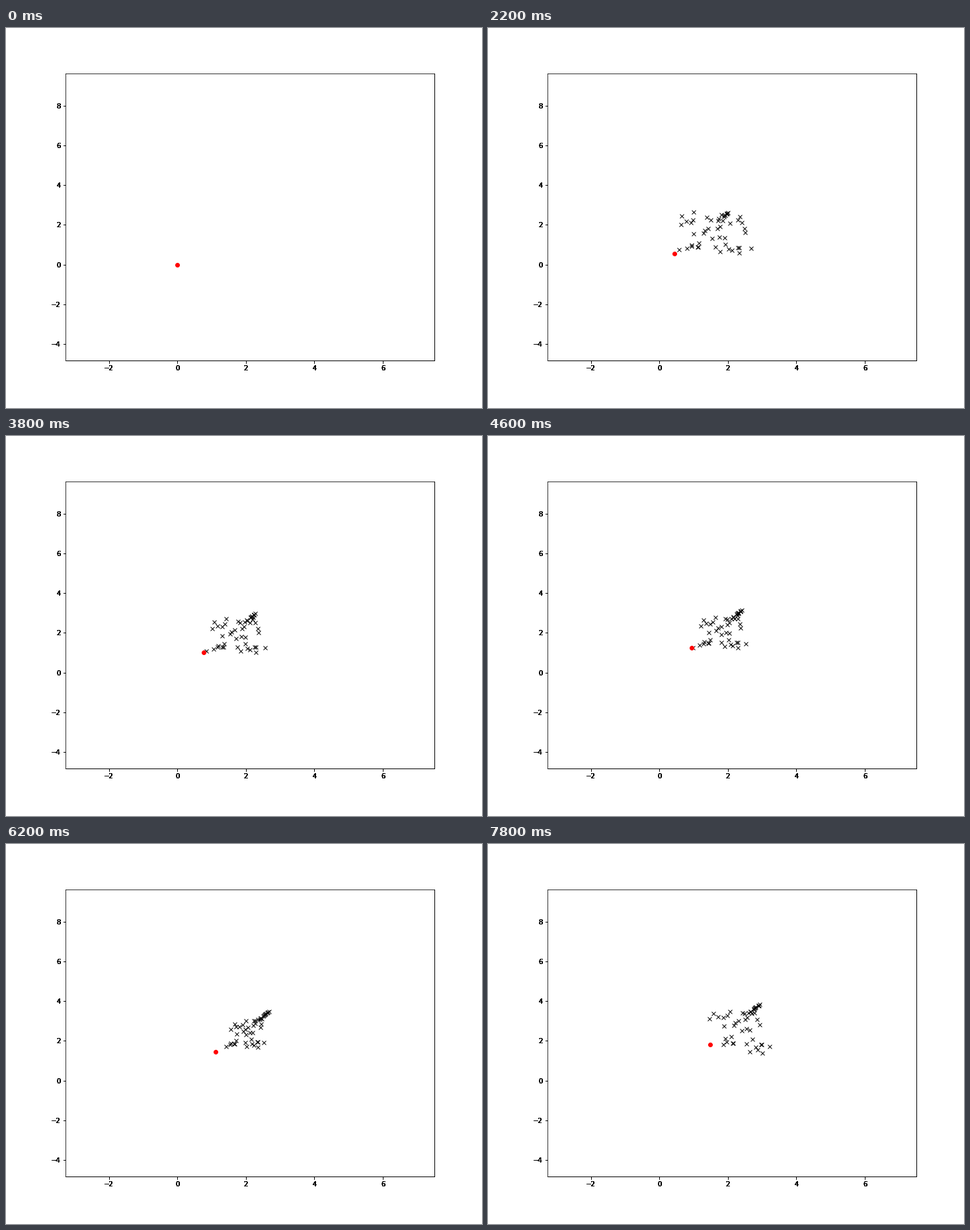
These frames come from a looping animation (720 px wide and 576 px high, 8 s). A matplotlib script:

```python
import numpy as np
import matplotlib.pyplot as plt
from matplotlib.animation import FuncAnimation

STEPS, INTERVAL = 40, 200
XLIM, YLIM = (-3.266, 7.504), (-4.834, 9.624)
SPEED = 0.0545                 # herd speed per step
FLEE, SCATTER = 0.087, 0.036   # push from the hunter, push from the leader
START, CAUGHT, PANIC, END = 1, 27, 31, STEPS - 1
PREY = 7                       # index of the animal that gets caught


def hunter(k):
    """Chase the prey, rest after the catch, then go on."""
    times = [START, CAUGHT, PANIC, END]
    return np.array([np.interp(k, times, [0, 1.12, 1.12, 1.485]),
                     np.interp(k, times, [0, 1.46, 1.46, 1.815])])


def unit(v):
    size = np.linalg.norm(v, axis=-1, keepdims=True)
    return v / np.maximum(size, 1e-9), size


def advance(herd, k):
    """The first animal flees; the rest follow it, and scatter in panic."""
    lead = herd[0]
    escape = SPEED * unit(lead - hunter(k))[0]
    way, gap = unit(lead - herd)
    if k < PANIC:
        move = way * np.minimum(gap, SPEED)
    else:
        away, _ = unit(herd - hunter(k))
        move = np.where(gap < 0.08, escape, FLEE * away - SCATTER * way)
    move[0] = escape
    return herd + move


def build_path():
    np.random.seed(0)
    path = [3 * np.random.rand(50, 2)]
    for k in range(END):
        path.append(advance(path[-1], k))
    return path


PATH = build_path()

fig = plt.figure(figsize=(10, 8), dpi=72, facecolor="white")


def add_axes():
    ax = fig.add_axes([0.125, 0.125, 0.775, 0.755], facecolor="none")
    ax.set(xlim=XLIM, ylim=YLIM,
           xticks=range(-2, 7, 2), yticks=range(-4, 9, 2))
    return ax


# stacked copies give heavy tick labels and darker right and bottom edges
for _ in range(7):
    layer = add_axes()
    layer.spines[["left", "top"]].set_visible(False)

ax = add_axes()
crosses, = ax.plot([], [], "kx", markersize=6)
dot, = ax.plot([], [], "ro", markersize=6)


def update(k):
    herd = PATH[k] if k else np.empty((0, 2))
    if k >= CAUGHT:
        herd = np.delete(herd, PREY, axis=0)
    crosses.set_data(herd[:, 0], herd[:, 1])
    x, y = hunter(k)
    dot.set_data([x], [y])
    return crosses, dot


anim = FuncAnimation(fig, update, frames=STEPS, interval=INTERVAL,
                     init_func=lambda: update(0), repeat=True, repeat_delay=0)
plt.show()
```
